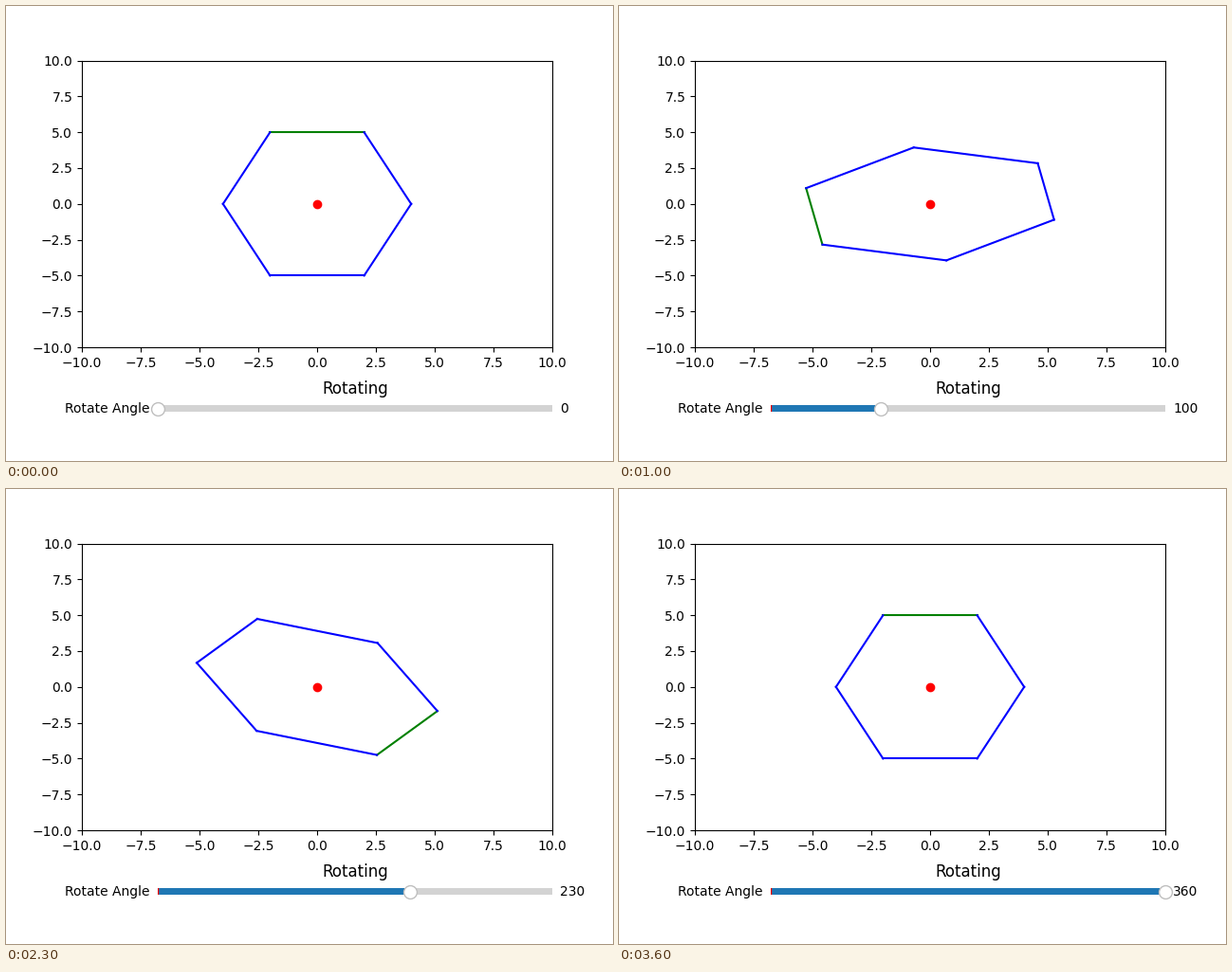
A matplotlib script that plays this animation: 640x480 px, repeating every 3700 ms.

```python
import numpy as np
import matplotlib.pyplot as plt
from matplotlib.animation import FuncAnimation
from matplotlib.widgets import Slider

STEP = 10      # degrees per frame
FRAMES = 37
INTERVAL = 100

corners = np.array([(2, 5), (-2, 5), (-4, 0), (-2, -5), (2, -5), (4, 0)], float)

fig, ax = plt.subplots(figsize=(6.4, 4.8), dpi=100)
fig.subplots_adjust(bottom=0.25)
ax.set_xlim(-10, 10)
ax.set_ylim(-10, 10)

ax.plot(0, 0, "ro")
edges = [ax.plot([], [], color="green" if i == 0 else "blue")[0]
         for i in range(len(corners))]

slider_ax = fig.add_axes([0.25, 0.1, 0.65, 0.03])
slider_ax.set_title("Rotating")
slider = Slider(slider_ax, "Rotate Angle", 0, 360, valinit=0, valfmt="%d")
slider.drawon = False


def rotate(points, degrees):
    a = np.radians(degrees)
    c, s = np.cos(a), np.sin(a)
    return points @ np.array([(c, s), (-s, c)])


def update(frame):
    angle = frame * STEP
    pts = rotate(corners, angle)
    for edge, start, end in zip(edges, pts, np.roll(pts, -1, axis=0)):
        edge.set_data([start[0], end[0]], [start[1], end[1]])
    slider.set_val(angle)
    return edges


anim = FuncAnimation(fig, update, frames=FRAMES, interval=INTERVAL,
                     repeat=True, repeat_delay=0, blit=False)
plt.show()
```
